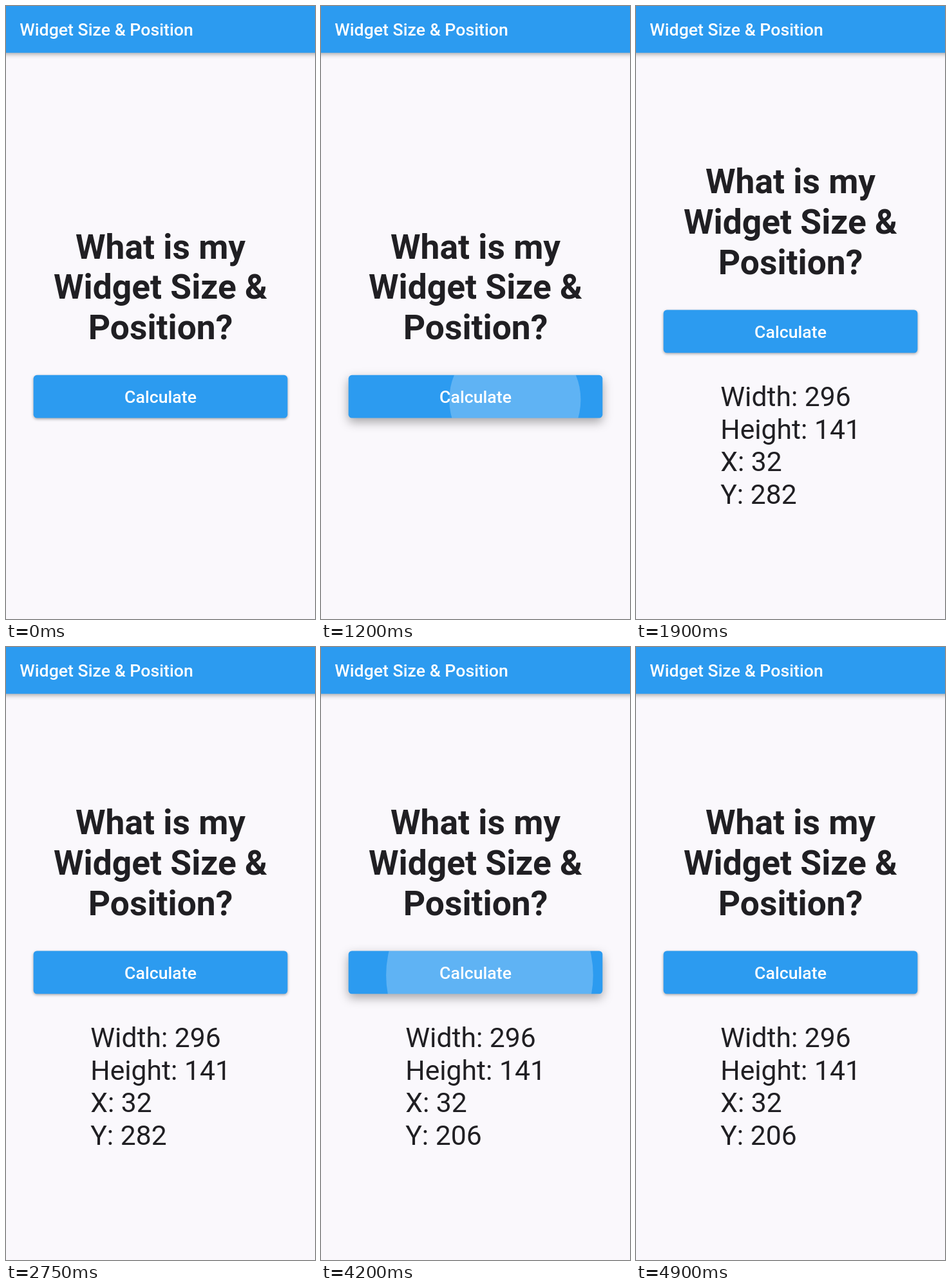
Recreate the animation shown at these times as an HTML page with a canvas. Size 480 by 953 pixels, loop 7900 ms.

```html
<!DOCTYPE html>
<html lang="en">
<head>
<meta charset="utf-8">
<title>Widget Size &amp; Position</title>
<style>
  html, body { margin: 0; width: 100%; height: 100%; overflow: hidden; background: #faf8fc; }
  canvas { display: block; width: 480px; height: 953px; }
</style>
</head>
<body>
<canvas id="stage"></canvas>
<script>
const W = 480, H = 953, LOOP = 7900, STEP = 50;
const DP = 4 / 3;
const BLUE = '#2c9bf0', PAGE = '#faf8fc', INK = '#201f23';
const BUTTON = { x: 32 * DP, w: 296 * DP, h: 50 * DP };
const TOP_START = 343.2, TOP_RESULT = TOP_START - 76 * DP;

// Touch point is relative to the button centre; the page reacts at `act`.
const taps = [
  { down: 1090, up: 1175, act: 1215, dx: 86, dy: 7 },
  { down: 4045, up: 4128, act: 4168, dx: 70, dy: 14 }
];

const canvas = document.getElementById('stage');
const ctx = canvas.getContext('2d');
const dpr = window.devicePixelRatio || 1;
canvas.width = W * dpr;
canvas.height = H * dpr;

const clamp = v => Math.max(0, Math.min(1, v));
const lerp = (a, b, k) => a + (b - a) * k;

function bezier(x1, y1, x2, y2) {
  const at = (a, b, s) => 3 * a * s * (1 - s) ** 2 + 3 * b * s * s * (1 - s) + s ** 3;
  return x => {
    let lo = 0, hi = 1;
    for (let i = 0; i < 24; i++) {
      const mid = (lo + hi) / 2;
      if (at(x1, x2, mid) < x) lo = mid; else hi = mid;
    }
    return at(y1, y2, (lo + hi) / 2);
  };
}
const ease = bezier(0.25, 0.1, 0.25, 1);
const fastOutSlowIn = bezier(0.4, 0, 0.2, 1);

function text(str, x, y, size, weight, color, align = 'left') {
  ctx.font = `${weight} ${size}px Roboto, sans-serif`;
  ctx.fillStyle = color;
  ctx.textAlign = align;
  ctx.fillText(str, x, y);
}

function raised(path, offset, blur, alpha) {
  ctx.save();
  ctx.shadowColor = `rgba(0,0,0,${alpha})`;
  ctx.shadowOffsetY = offset * dpr;
  ctx.shadowBlur = blur * dpr;
  ctx.fillStyle = BLUE;
  ctx.fill(path);
  ctx.restore();
}

function elevation(t) {
  let e = 2;
  for (const tap of taps) {
    const rise = fastOutSlowIn(clamp((t - tap.down) / 150));
    const fall = fastOutSlowIn(clamp((t - tap.act) / 200));
    e += 6 * rise * (1 - fall);
  }
  return e;
}

function ripple(t, tap, cx, cy) {
  if (t < tap.down || t > tap.up + 375) return;
  const held = Math.min(t, tap.up) - tap.down;
  const k = ease(clamp(held / 1000 + Math.max(0, t - tap.up) / 225));
  const full = Math.hypot(BUTTON.w, BUTTON.h) / 2;
  const fade = clamp((t - tap.down) / 75) * (1 - clamp((t - tap.up - 225) / 150));
  ctx.fillStyle = `rgba(255,255,255,${0.24 * fade})`;
  ctx.beginPath();
  ctx.arc(cx + tap.dx * (1 - k), cy + tap.dy * (1 - k),
    lerp(full * 0.3, full + 5 * DP, k), 0, Math.PI * 2);
  ctx.fill();
}

function drawButton(t, y) {
  const path = new Path2D();
  path.roundRect(BUTTON.x, y, BUTTON.w, BUTTON.h, 4 * DP);
  const e = elevation(t);
  raised(path, e * 0.8, e * 2.1, 0.34);

  const cy = y + BUTTON.h / 2;
  ctx.save();
  ctx.clip(path);
  for (const tap of taps) ripple(t, tap, W / 2, cy);
  ctx.restore();
  text('Calculate', W / 2, cy + 9.7, 20 * DP, 500, '#fff', 'center');
}

function draw(t) {
  ctx.setTransform(dpr, 0, 0, dpr, 0, 0);
  ctx.fillStyle = PAGE;
  ctx.fillRect(0, 0, W, H);

  const bar = new Path2D();
  bar.rect(-20, -20, W + 40, 92.8);
  raised(bar, 2, 7, 0.34);
  text('Widget Size & Position', 16 * DP, 46, 20 * DP, 500, '#fff');

  const measured = t >= taps[0].act;
  const top = measured ? TOP_RESULT : TOP_START;
  ['What is my', 'Widget Size &', 'Position?'].forEach((line, i) =>
    text(line, W / 2, top + (37 + 47 * i) * DP, 40 * DP, 700, INK, 'center'));

  const buttonY = top + (141 + 32) * DP;
  drawButton(t, buttonY);

  if (measured) {
    const y = t >= taps[1].act ? 206 : 282;
    const first = buttonY + BUTTON.h + (32 + 30) * DP;
    ['Width: 296', 'Height: 141', 'X: 32', `Y: ${y}`].forEach((line, i) =>
      text(line, 131.2, first + 38 * DP * i, 32 * DP, 400, INK));
  }
}

function tick() {
  const t = performance.now() % LOOP;
  draw(Math.floor(t / STEP) * STEP);
  requestAnimationFrame(tick);
}
tick();
</script>
</body>
</html>
```
